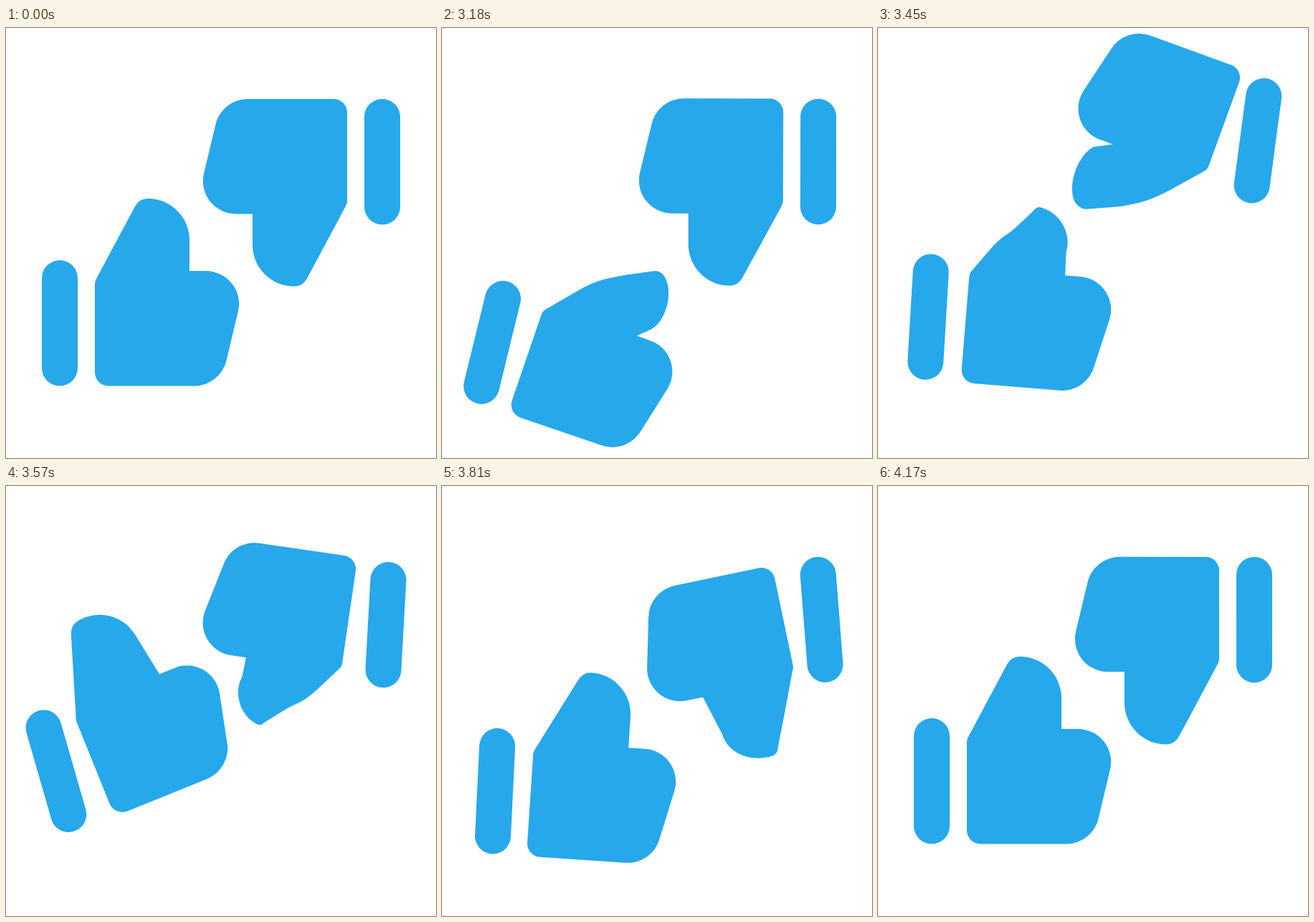
Write an HTML page that moves like this. It is 600 by 600 pixels and loops after 4230 ms.

```html
<!DOCTYPE html>
<html lang="en">
<head>
<meta charset="utf-8">
<title>Thumbs</title>
<style>
html, body { margin: 0; width: 100%; height: 100%; overflow: hidden; background: #fff; }
svg { display: block; width: 100%; height: 100%; fill: #26a8eb; }
</style>
</head>
<body>
<svg viewBox="0 0 600 600">
  <g id="up">
    <rect x="50" y="324" width="50" height="175.5" rx="25"/>
    <path/>
  </g>
  <g id="down" transform="rotate(180 300 299.25)">
    <rect x="50" y="324" width="50" height="175.5" rx="25"/>
    <path/>
  </g>
</svg>
<script>
const LOOP = 4230, STEP = 30, START = 3030, DELAY = 140;
const PIVOT = [75, 412], SWING = 9.5;

// Key poses: ms, hand angle, vertical shift, thumb bend (1 curled, -1 thrown back)
const poses = [
  [0, 0, 0, 0],
  [190, 21.3, 30.5, 1],
  [280, 20, 29.5, 1],
  [400, 8.3, -7, 0.5],
  [540, -22, -14, -1],
  [640, -11.8, 0.3, -0.6],
  [780, 3.8, 14, 0],
  [1010, 0, 0, 0]
];

// Thumb outline: straight position, curled position, bow of the way between them
const thumb = [
  [[126, 350], [126, 349], [0, -6]],
  [[150, 305], [181, 286], [0, -2]],
  [[158, 290], [216, 263], [0, 4]],
  [[180, 249], [265, 241], [-3, 8]],
  [[186, 238], [273, 239], [-5, 8]],
  [[198, 238], [282, 245], [-10, 8]],
  [[230, 238], [301, 262], [-10, 8]],
  [[256, 264], [301, 311], [-10, 2]],
  [[256, 296], [283, 327], [-10, 0]]
];
const wristAt = thumb[0][0];

const mix = (a, b, k) => [a[0] + (b[0] - a[0]) * k, a[1] + (b[1] - a[1]) * k];

function ease(u) {
  u = Math.min(1, Math.max(0, u));
  return u * u * (3 - 2 * u);
}

function rotate([x, y], [cx, cy], deg) {
  const r = deg * Math.PI / 180, c = Math.cos(r), s = Math.sin(r);
  return [cx + (x - cx) * c - (y - cy) * s, cy + (x - cx) * s + (y - cy) * c];
}

// Smooth curve through one column of the poses, without overshoot
function sample(col, t) {
  const last = poses.length - 1;
  t = Math.min(poses[last][0], Math.max(0, t));
  let i = 0;
  while (i < last - 1 && t >= poses[i + 1][0]) i++;
  const rate = j => (poses[j + 1][col] - poses[j][col]) / (poses[j + 1][0] - poses[j][0]);
  const slope = j => {
    if (j === 0 || j === last) return 0;
    const a = rate(j - 1), b = rate(j);
    return a * b <= 0 ? 0 : 2 * a * b / (a + b);
  };
  const from = poses[i], to = poses[i + 1];
  const d = to[0] - from[0], u = (t - from[0]) / d, w = 1 - u;
  return from[col] + (to[col] - from[col]) * ease(u)
    + d * u * w * (slope(i) * w - slope(i + 1) * u);
}

function handPath(bend) {
  const curl = Math.max(bend, 0), thrown = Math.min(bend, 0);
  const arch = 4 * Math.abs(bend) * (1 - Math.abs(bend));
  const p = thumb.map(([straight, curled, bow], i) => {
    const [x, y] = rotate(mix(straight, curled, curl), wristAt, SWING * thrown);
    const k = thrown && i < 3 ? 0 : arch;
    return [x + bow[0] * k, y + bow[1] * k];
  });
  const [wrist, k1, k2, tip, corner, top, c, d, side] = p;
  return `M124 ${wrist[1] + 7}Q124 ${wrist[1] + 3} ${wrist}`
    + `L${mix(wrist, k1, 0.65)}Q${k1} ${mix(k1, k2, 0.5)}Q${k2} ${mix(k2, tip, 0.3)}`
    + `L${tip}Q${corner} ${top}C${c} ${d} ${side}L${256 + 4 * curl} 339`
    + `H279A46 46 0 0 1 324 395L308 462A46 46 0 0 1 263 499.5H143A19 19 0 0 1 124 480.5Z`;
}

function pose(id, t, barShare) {
  const [bar, hand] = document.getElementById(id).children;
  const [turn, lift, bend] = [1, 2, 3].map(col => sample(col, t));
  const drift = ease(t / 150) * (1 - ease((t - 600) / 250));
  const place = (el, x, angle) =>
    el.setAttribute('transform', `translate(${x} ${lift}) rotate(${angle} ${PIVOT})`);
  place(bar, -5 * drift, turn * barShare);
  place(hand, -1.5 * drift, turn);
  hand.setAttribute('d', handPath(bend));
}

function draw(now) {
  const t = Math.floor(now % LOOP / STEP) * STEP - START;
  pose('up', t, 0.73);
  pose('down', t - DELAY, 0.38);
}

const start = performance.now();
function tick() {
  draw(performance.now() - start);
  requestAnimationFrame(tick);
}
tick();
</script>
</body>
</html>
```
